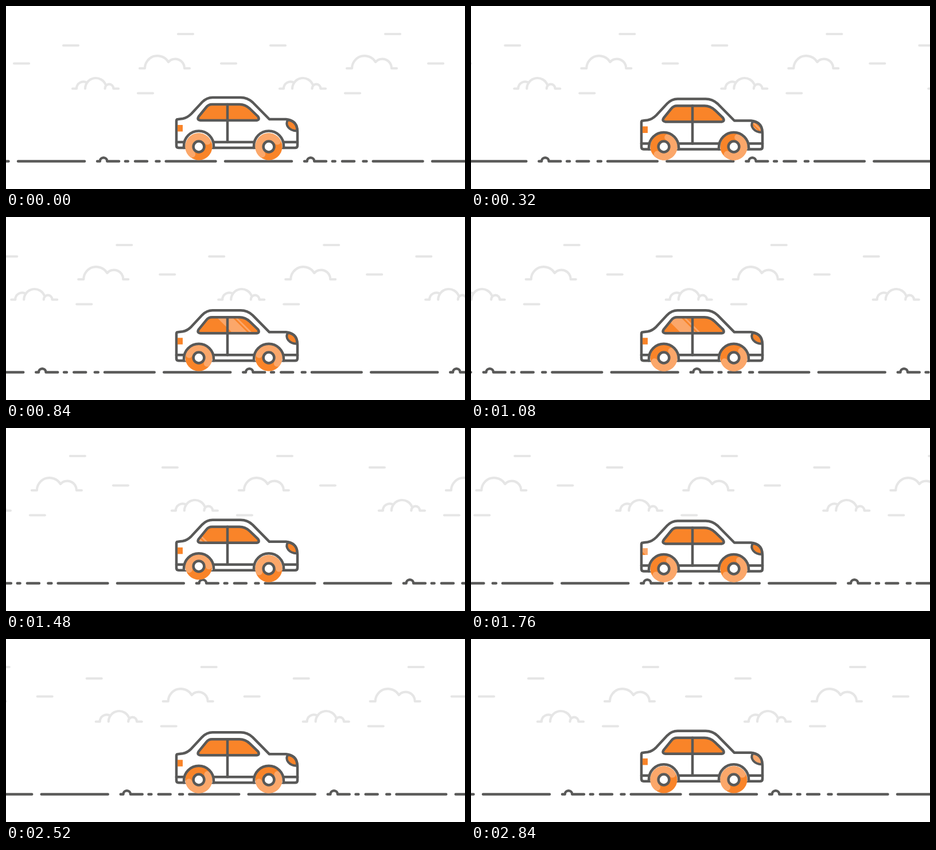
Recreate the animation shown at these times as an HTML page. Size 800 px wide and 320 px high, loop 2880 ms.

```html
<!DOCTYPE html>
<html lang="en">
<head>
<meta charset="utf-8">
<title>Car on the road</title>
<style>
  html, body { margin: 0; width: 100%; height: 100%; overflow: hidden; background: #fff; }
  svg { display: block; width: 100%; height: 100%; }
  .line, .sky { fill: none; stroke: #595958; stroke-width: 4.5; stroke-linecap: round; stroke-linejoin: round; }
  .sky { stroke: #e6e6e6; stroke-width: 4.2; }
  .orange { fill: #f98429; }
  .light { fill: #fba76a; }
  .white { fill: #fff; }
</style>
</head>
<body>
<svg viewBox="0 0 800 320">
  <defs>
    <g id="tile">
      <path class="sky" d="M300 49H326M100 69H126M14 100.5H40M230 152.5H256
        M233 109H242A22 22 0 0 1 283 98A16 16 0 0 1 311 109H320
        M116 144.5H123A12 12 0 0 1 141 134
        M138 144.5A18.5 18.5 0 0 1 174 138.5
        M172.500 144.5A7.400 7.900 0 0 1 187.300 144.5H196"/>
      <path class="line" d="M159 271.5H163.700A6.300 6.300 0 0 1 176.300 271.5H197M207.800 271.5H212.700M225 271.5H246
        M261.500 271.5H267.500M278.700 271.5H365.500M382 271.5H498"/>
    </g>
    <path id="glass" d="M339 200Q332 199 336 193L349 177Q353 172 359 172H407C414 172 419 174 425 179.500L439 193Q443 199 437 200Z"/>
    <path id="lamp" d="M491 199.500C486 208 493 218 507 218.500C508 208 501 200 491 199.500Z"/>
    <path id="tail" d="M299 208H308V219.500H299Z"/>
    <g id="wheel">
      <circle class="orange" r="23.500"/>
      <path class="light" d="M-23.100 4.100A23.500 23.500 0 1 1 23.100 4.100A5.750 5.750 0 0 1 11.800 2.100H-11.800A5.750 5.750 0 0 1 -23.100 4.100Z"/>
    </g>
    <clipPath id="shiny">
      <use href="#glass"/><use href="#lamp"/><use href="#tail"/>
    </clipPath>
    <clipPath id="well"><path d="M-26 60V0A26 26 0 0 1 26 0V60Z"/></clipPath>
  </defs>
  <g id="scene"></g>
  <g id="car">
    <path class="line" style="fill:#fff" d="M297 244V201Q297 198 300 198L308 197Q316 195.500 323 188.500L342 168Q350 160 360 160H409
      C418 160 424 163 430 168.500L459 198H488Q508 200 508 220V244Q508 248 504 248H301Q297 248 297 244Z"/>
    <path class="line" d="M297 238H508"/>
    <use href="#tail" class="orange"/>
    <use href="#lamp" class="orange"/>
    <use href="#glass" class="orange"/>
    <g clip-path="url(#shiny)"><g id="glints" class="light"></g></g>
    <use href="#glass" class="line"/>
    <use href="#lamp" class="line" style="stroke-width:4"/>
    <path class="line" d="M386 172V238"/>
    <g id="wheels"></g>
  </g>
</svg>
<script>
const FRAME = 40, LOOP = 2880, LAST = 71;
const PERIOD = 361, BUMP = 170;
const AXLES = [336, 458], AXLE_Y = 246, ARCH_Y = 244.5;
const $ = id => document.getElementById(id);
const move = (el, x, y = 0) => el.setAttribute("transform", `translate(${x} ${y})`);

$("scene").innerHTML = [0, 1, 2, 3, 4]
  .map(i => `<use href="#tile" x="${(i - 1) * PERIOD}"/>`).join("");

// Slanted bands, x measured at y = 187
const band = (a, b) => `M${a - 37} 150H${b - 37}L${b + 63} 250H${a + 63}Z`;
$("glints").innerHTML = [0, 327]
  .map(x => `<path d="${band(x - 14, x + 13)}${band(x + 17, x + 21)}"/>`).join("");

const ARCH = "M-26 3.5V0A26 26 0 0 1 26 0V3.5";
$("wheels").innerHTML = AXLES.map(x => `
  <g transform="translate(${x} ${ARCH_Y})">
    <path class="white" d="${ARCH}Z"/>
    <g clip-path="url(#well)">
      <g class="axle">
        <use href="#wheel"/>
        <circle class="line" style="fill:#fff" r="9.4"/>
      </g>
    </g>
    <path class="line" d="${ARCH}"/>
  </g>`).join("");
const axles = [...document.querySelectorAll(".axle")];

// Rise of a wheel rolling over the bump at distance d
const lift = d => Math.abs(d) < 16.5 ? Math.sqrt(900 - d * d) - 25 : 0;

function draw(ms) {
  const f = Math.floor((ms % LOOP) / FRAME);
  const p = f / LAST, shift = PERIOD * p;
  const bob = 1.65 * (1 - Math.cos(f * Math.PI / 3));
  move($("scene"), -shift);
  move($("car"), 0, bob);
  move($("glints"), 497 - 0.12 * f * FRAME);
  axles.forEach((axle, i) => {
    const rise = lift(BUMP + PERIOD - shift - AXLES[i]);
    move(axle, 0, AXLE_Y - ARCH_Y - rise - bob);
    axle.firstElementChild.setAttribute("transform", `rotate(${1440 * p - 40})`);
  });
}

let start;
function tick(now) {
  start ??= now;
  draw(now - start);
  requestAnimationFrame(tick);
}
draw(0);
requestAnimationFrame(tick);
</script>
</body>
</html>
```
